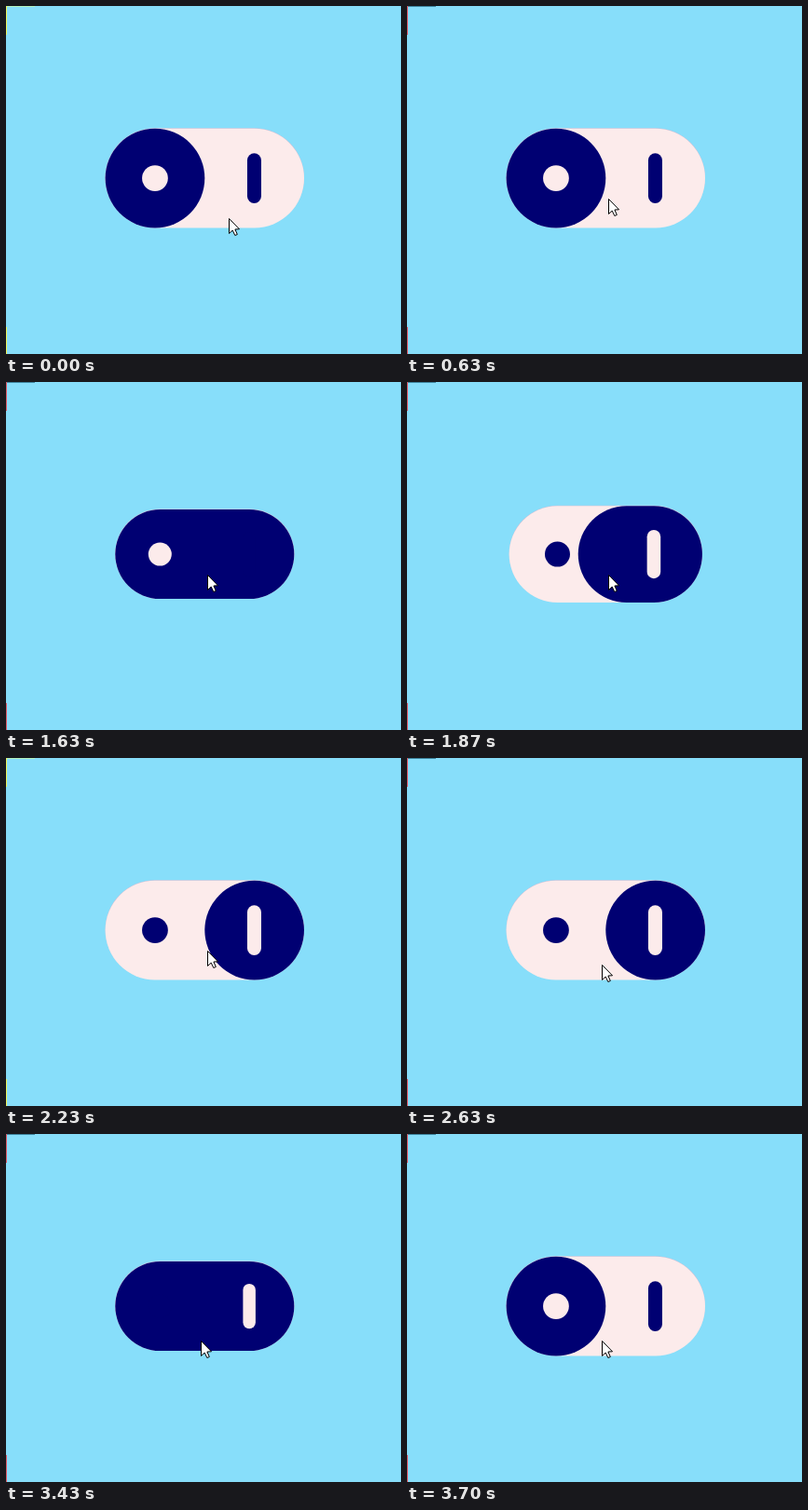
Animation of 424 by 374 pixels, one loop 3910 ms. Source, as an HTML page with a canvas:

```html
<!DOCTYPE html>
<html lang="en">
<head>
<meta charset="utf-8">
<title>Toggle switch</title>
<style>
html, body { margin: 0; width: 100%; height: 100%; overflow: hidden; background: #87defa; }
canvas { display: block; }
</style>
</head>
<body>
<canvas id="stage" width="424" height="374"></canvas>
<script>
const ctx = document.getElementById('stage').getContext('2d');
const LOOP = 3910, BLINK = 490, STEP = 50, STEP_OFFSET = 20;
const SKY = '#87defa', PINK = '#fcebeb', NAVY = '#000072', RIM = '#cdbfd6';
const CX = 213.3, CY = 185.1, SIZE = 106.7;
const EASE_TIME = 190;

// Two clicks: each presses the handle wide, then releases it on the other side.
const PRESS_ON = 1096, RELEASE_ON = 1747;
const PRESS_OFF = 2970, RELEASE_OFF = 3475;

function ramp(t, start, length = EASE_TIME) {
  const x = Math.min(1, Math.max(0, (t - start) / length));
  return x * x * (3 - 2 * x);
}

// The motion refreshes in even steps and holds still in between.
function hold(time) {
  return Math.floor((time - STEP_OFFSET) / STEP) * STEP + STEP_OFFSET;
}

function pill(x, y, w, h, color) {
  ctx.fillStyle = color;
  ctx.beginPath();
  ctx.roundRect(x, y, w, h, Math.min(w, h) / 2);
  ctx.fill();
}

function centeredPill(x, w, h, color) {
  pill(x - w / 2, -h / 2, w, h, color);
}

function drawToggle(t) {
  const stretch = ramp(t, PRESS_ON) - ramp(t, RELEASE_ON)
                + ramp(t, PRESS_OFF) - ramp(t, RELEASE_OFF);
  const on = t >= RELEASE_ON && t < RELEASE_OFF;
  const left = on ? -SIZE * stretch : -SIZE;
  const scale = 1 - 0.1 * stretch;

  ctx.save();
  ctx.translate(CX, CY);
  ctx.scale(scale, scale);
  pill(-SIZE, -SIZE / 2 - 0.6, SIZE * 2, SIZE, RIM);
  pill(-SIZE, -SIZE / 2, SIZE * 2, SIZE, PINK);
  pill(left, -SIZE / 2, SIZE * (1 + stretch), SIZE, NAVY);
  centeredPill(-SIZE / 2, 27.8, 27.8, on ? NAVY : PINK);
  centeredPill(SIZE / 2 - 0.2, 15, 53.8, on ? PINK : NAVY);
  ctx.restore();
}

function drawCorners(time) {
  const red = Math.floor(time / BLINK) % 2 === 1;
  ctx.fillStyle = red ? '#3f86a0' : '#b4f2c0';
  ctx.fillRect(0, 0, 31, 1);
  ctx.fillStyle = red ? '#dc5a68' : '#eef45a';
  ctx.fillRect(0, 0, 1, 31);
  ctx.fillRect(0, 345, 1, 29);
}

function drawCursor(time) {
  const jump = time >= 30 ? 1 : 0;
  const drift = ramp(hold(time), 2200, 400);
  const x = 239 - 23 * jump - 7 * drift;
  const y = 228 - 21 * jump + 15 * drift;

  ctx.save();
  ctx.translate(Math.round(x) + 0.5, Math.round(y) + 0.5);
  ctx.fillStyle = '#fff';
  ctx.strokeStyle = '#000';
  const arrow = new Path2D('M0 0V16L3.7 12.6L6.3 18L8.8 17L6.4 11.5L11 11.3Z');
  ctx.fill(arrow);
  ctx.stroke(arrow);
  ctx.restore();
}

function draw(time) {
  ctx.fillStyle = SKY;
  ctx.fillRect(0, 0, 424, 374);
  drawToggle(hold(time));
  drawCorners(time);
  drawCursor(time);
}

const origin = performance.now();
function loop() {
  draw((performance.now() - origin) % LOOP);
  requestAnimationFrame(loop);
}
loop();
</script>
</body>
</html>
```
